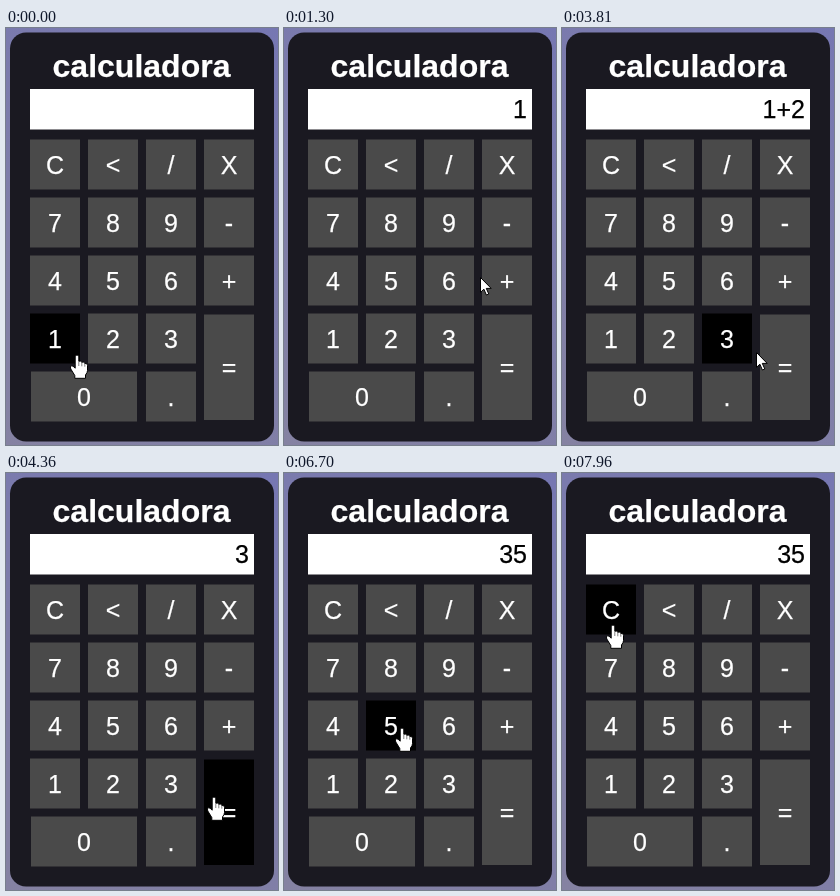
Animation, 272 px wide and 417 px high, one loop 8 s. Source, as an HTML page with a canvas:

```html
<!DOCTYPE html>
<html lang="pt">
<head>
<meta charset="utf-8">
<title>calculadora</title>
<style>
  html, body { margin: 0; width: 100%; height: 100%; overflow: hidden; background: #7d7caa; }
  canvas { display: block; width: 272px; height: 417px; }
</style>
</head>
<body>
<canvas id="stage"></canvas>
<script>
const W = 272, H = 417, LOOP = 8000, TICK = 70;
const FONT = 'Arial, "Liberation Sans", sans-serif';
const canvas = document.getElementById('stage');
const ctx = canvas.getContext('2d');
const ratio = window.devicePixelRatio || 1;
canvas.width = Math.round(W * ratio);
canvas.height = Math.round(H * ratio);

const buttons = [];
['C</X', '789-', '456+', '123'].forEach((row, r) => {
  [...row].forEach((label, c) => {
    buttons.push({ label, x: 24 + c * 58, y: 111.5 + r * 58, w: 50, h: 50 });
  });
});
buttons.push({ label: '0', x: 25, y: 343.5, w: 106, h: 50 });
buttons.push({ label: '.', x: 140, y: 343.5, w: 50, h: 50 });
buttons.push({ label: '=', x: 198, y: 286.5, w: 50, h: 105.5 });

const readings = [
  { start: 0, value: '' }, { start: 520, value: '1' }, { start: 1900, value: '1+' },
  { start: 3210, value: '1+2' }, { start: 4290, value: '3' }, { start: 5840, value: '35' }
];

// Each trip is a curve from the previous resting place, pulled towards "bend"
const HOME = [71, 327];
const trips = [
  { start: 70, end: 170, bend: [61, 312], to: [51, 300] },
  { start: 720, end: 1510, bend: [188, 253], to: [217, 240] },
  { start: 2320, end: 2880, bend: [152, 306], to: [99, 291] },
  { start: 3470, end: 4090, bend: [215, 335], to: [208, 324] },
  { start: 5040, end: 5510, bend: [140, 277], to: [104, 252] },
  { start: 5770, end: 5970, bend: [108, 249], to: [111, 246] },
  { start: 6700, end: 7470, bend: [270, 440], to: [95, 310], ease: 1.5 },
  { start: 7540, end: 7960, bend: [45, 210], to: [51, 152] }
];

const current = (list, t) => list.filter(item => item.start <= t).pop();

// The pointer moves in ticks; lag is a part of a tick
function pointerAt(t, lag = 0) {
  const now = t + TICK / 7;
  const trip = current(trips, now);
  if (!trip) return HOME;
  const { start, end, bend, to, ease = 1 } = trip;
  const from = trip === trips[0] ? HOME : trips[trips.indexOf(trip) - 1].to;
  const count = Math.round((end - start) / TICK) + 1;
  const step = Math.floor((now - start) * (count - 1) / (end - start)) + 1;
  const p = Math.min(1, (step - lag) / count) ** ease, q = 1 - p;
  return from.map((a, i) => q * q * a + 2 * p * q * bend[i] + p * p * to[i]);
}

const buttonAt = ([x, y]) =>
  buttons.find(b => x >= b.x && x < b.x + b.w && y >= b.y && y < b.y + b.h);

function text(str, x, y, size, color, align, weight = '') {
  ctx.font = `${weight} ${size}px ${FONT}`;
  ctx.textAlign = align;
  ctx.fillStyle = ctx.strokeStyle = color;
  ctx.lineWidth = 0.25;
  ctx.fillText(str, x, y);
  ctx.strokeText(str, x, y);
}

const arrow = new Path2D('M.5 .5V15.3L3.9 12.2L6.4 18L8.8 17L6.3 11.4H11.2Z');
const hand = new Path2D(
  'M-1.8 1.8Q-1.8 0 0 0Q1.8 0 1.8 1.8V6.2Q4 5.6 4.8 7.2Q7 6.6 7.8 8.3' +
  'Q10.5 7.8 10.5 10.5V15.5Q10.5 17.5 8.5 20V23.3H-2.2V20.5L-6.2 14' +
  'Q-7.4 11.6 -5.8 10.8Q-4.2 10.3 -1.8 13.2Z');
const knuckles = new Path2D('M1.8 6.5V11M4.8 7.5V11.3M7.8 8.6V11.7');

function drawPointer([x, y], isHand) {
  const shape = isHand ? hand : arrow;
  ctx.save();
  ctx.translate(Math.round(x), Math.round(y));
  ctx.lineJoin = 'round';
  ctx.lineWidth = 1;
  ctx.strokeStyle = '#000';
  ctx.fillStyle = '#fff';
  ctx.fill(shape);
  ctx.stroke(shape);
  if (isHand) {
    ctx.lineWidth = 0.5;
    ctx.stroke(knuckles);
  }
  ctx.restore();
}

function draw(t) {
  ctx.setTransform(ratio, 0, 0, ratio, 0, 0);
  const sky = ctx.createLinearGradient(0, H, W, 0);
  sky.addColorStop(0, '#8582a2');
  sky.addColorStop(1, '#7677b2');
  ctx.fillStyle = sky;
  ctx.fillRect(0, 0, W, H);

  ctx.fillStyle = '#1a1921';
  ctx.beginPath();
  ctx.roundRect(4, 4.5, 264, 409, 16);
  ctx.fill();

  text('calculadora', 135.5, 49, 32, '#fff', 'center', 'bold');
  ctx.fillStyle = '#fff';
  ctx.fillRect(24, 61, 224, 40.5);
  text(current(readings, t).value, 243, 90, 25, '#000', 'right');

  const tip = pointerAt(t);
  const hovered = buttonAt(pointerAt(t, 0.5));
  for (const b of buttons) {
    ctx.fillStyle = b === hovered ? '#000' : '#4a4a4a';
    ctx.fillRect(b.x, b.y, b.w, b.h);
    const baseline = Math.floor(b.y + b.h / 2 + 9.5);
    text(b.label, b.x + b.w / 2, baseline, 25, '#fff', 'center');
  }
  drawPointer(tip, Boolean(buttonAt(tip)));
}

const begin = performance.now();
function frame() {
  draw((performance.now() - begin) % LOOP);
  requestAnimationFrame(frame);
}
draw(0);
requestAnimationFrame(frame);
</script>
</body>
</html>
```
